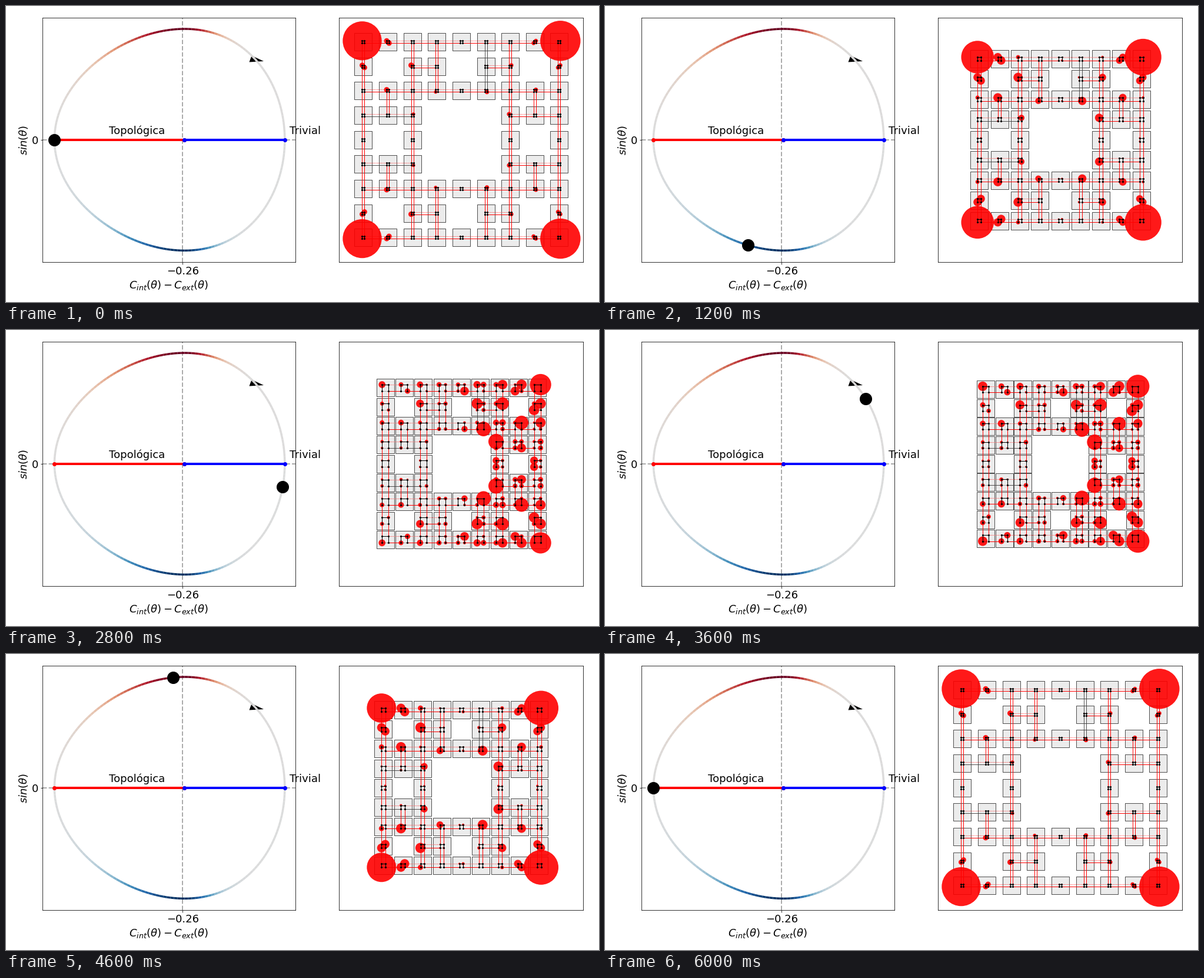
Animation, 1008 px wide and 504 px high, one loop 6200 ms. Source, as a matplotlib script:

```python
import numpy as np
import matplotlib.pyplot as plt
from matplotlib.animation import FuncAnimation
from matplotlib.collections import LineCollection

STEPS = 30
CX, CY = 773.9, 227.7
UNIT = 1260          # squared radius in px for a full unit of density

plt.rcParams["font.family"] = "DejaVu Sans"
fig = plt.figure(figsize=(14, 7), dpi=72)


def panel(x0, x1, y0=20, y1=436):
    """Axes whose data units are stage pixels, y pointing down."""
    ax = fig.add_axes([x0 / 1008, 1 - y1 / 504, (x1 - x0) / 1008, (y1 - y0) / 504])
    ax.set(xlim=(x0, x1), ylim=(y1, y0))
    return ax


# ---- parameter loop -------------------------------------------------
def loop_xy(phi):
    c = np.cos(phi)
    x = 303.6 - 188.7 * c - 25.5 * c**2 - 7.05 * c**3
    return x, CY + 188.7 * np.sin(phi)


def loop_colors(phi):
    d = np.degrees(np.abs(phi)) - 89
    v = -np.sign(phi) * np.exp(-(d / np.where(d < 0, 37, 19)) ** 2)
    rgb = plt.cm.RdBu_r(0.5 + v / 2)
    rgb[:, :3] *= (1 - 0.11 * (1 - np.abs(v)))[:, None]
    return rgb


left = panel(62, 492)
left.axhline(CY, color="0.67", ls="--", lw=2, zorder=0)
left.axvline(300.3, color="0.67", ls="--", lw=2, zorder=0)
left.fill([417.5, 438, 413.5], [84.5, 94, 95.5], color="k", lw=0, zorder=1)

phi = np.linspace(-np.pi, np.pi, 201)
pts = np.column_stack(loop_xy(phi))
left.add_collection(LineCollection(np.stack([pts[:-1], pts[1:]], 1), lw=3.5,
                                   colors=loop_colors((phi[:-1] + phi[1:]) / 2), zorder=2))
left.plot([82.3, 303.4], [CY] * 2, "r-o", lw=4, ms=6, zorder=3)
left.plot([303.4, 473.8], [CY] * 2, "b-o", lw=4, ms=6, zorder=3)
left.text(175, 217.7, "Topológica", fontsize=18)
left.text(482, 217.7, "Trivial", fontsize=18)
left.set_xticks([300.3], ["−0.26"], fontsize=18)
left.set_yticks([CY], ["0"], fontsize=18)
left.set_xlabel(r"$C_{int}(\theta)-C_{ext}(\theta)$", fontsize=18)
left.set_ylabel(r"$sin(\theta)$", fontsize=18)
ball, = left.plot([], [], "ko", ms=20, zorder=5)


# ---- carpet lattice -------------------------------------------------
def in_carpet(i, j):
    return not ((i % 3 == 1 and j % 3 == 1) or (i // 3 == 1 and j // 3 == 1))


cells = [(i, j) for i in range(9) for j in range(9) if in_carpet(i, j)]
index = {c: n for n, c in enumerate(cells)}
grid = np.array(cells) - 4
TL, TR, BL, BR = range(4)
corner = np.array([(-1, -1), (-1, 1), (1, -1), (1, 1)]) / 2


def dark_bond(i, j, down):
    return (down and j == 5 and i < 2) or (not down and i in (3, 5) and j < 2)


bonds = {k: [] for k in ("in", "in_dot", "out", "out_dark", "out_dot")}
for (i, j), n in index.items():
    a = 4 * n
    bonds["in"] += [(a + TL, a + TR), (a + TL, a + BL), (a + TR, a + BR)]
    bonds["in_dot"].append((a + BL, a + BR))
    if (i, j + 1) in index:
        b = 4 * index[i, j + 1]
        kind = "out_dark" if dark_bond(i, j, False) else "out"
        bonds[kind].append((a + BR, b + BL))
        bonds["out_dot"].append((a + TR, b + TL))
    if (i + 1, j) in index:
        b = 4 * index[i + 1, j]
        kind = "out_dark" if dark_bond(i, j, True) else "out"
        bonds[kind] += [(a + BL, b + TL), (a + BR, b + TR)]
bonds = {k: np.array(v) for k, v in bonds.items()}


def spacing(phi):
    c = np.cos(phi)
    return 6.67 * np.exp(-0.51 * c), 25.9 + 8.15 * c + 3.55 * c**2


def density(d_in, d_out):
    """Weight of the four states closest to zero energy.

    The coupling inside a cell weakens slightly from left to right.
    """
    h = np.zeros((4 * len(cells),) * 2)
    for kind, pairs in bonds.items():
        t = 1
        if kind.startswith("in"):
            t = 1.12 * d_in / d_out * (1 - 0.035 * grid[pairs[:, 0] // 4, 1])
        h[pairs[:, 0], pairs[:, 1]] = -t if kind.endswith("dot") else t
    e, v = np.linalg.eigh(h + h.T)
    return (v[:, np.argsort(np.abs(e))[:4]] ** 2).sum(1)


right = panel(566, 981)
right.set(xticks=[], yticks=[])
boxes = right.scatter([], [], s=900, marker="s", fc="#ececec", ec="0.15", lw=0.8, zorder=1)
disks = right.scatter([], [], c="r", alpha=0.9, lw=0, zorder=1.5)
dots = right.scatter([], [], s=10, c="k", lw=0, zorder=3)
styles = {"in": ("k", "-", 1), "in_dot": ("k", ":", 0.8), "out": ("r", "-", 1),
          "out_dark": ("0.25", "-", 0.9), "out_dot": ("r", ":", 0.9)}
links = {}
for kind, (color, ls, lw) in styles.items():
    links[kind] = LineCollection([], colors=color, linestyles=ls, linewidths=lw, zorder=2)
    right.add_collection(links[kind], autolim=False)


def draw(k):
    phi = 2 * np.pi * k / STEPS
    x, y = loop_xy(phi)
    ball.set_data([x], [y])

    d_in, d_out = spacing(phi)
    centers = grid * (d_in + d_out)
    sites = (centers[:, None] + corner * d_in).reshape(-1, 2)
    centers = centers[:, ::-1] + (CX, CY)
    sites = sites[:, ::-1] + (CX, CY)
    boxes.set_offsets(centers)
    dots.set_offsets(sites)
    disks.set_offsets(sites)
    disks.set_sizes(4 * UNIT * density(d_in, d_out))
    for kind, lines in links.items():
        lines.set_segments(sites[bonds[kind]])
    return [ball, boxes, disks, dots, *links.values()]


anim = FuncAnimation(fig, draw, frames=STEPS + 1, interval=200, repeat=True, repeat_delay=0)
plt.show()
```
